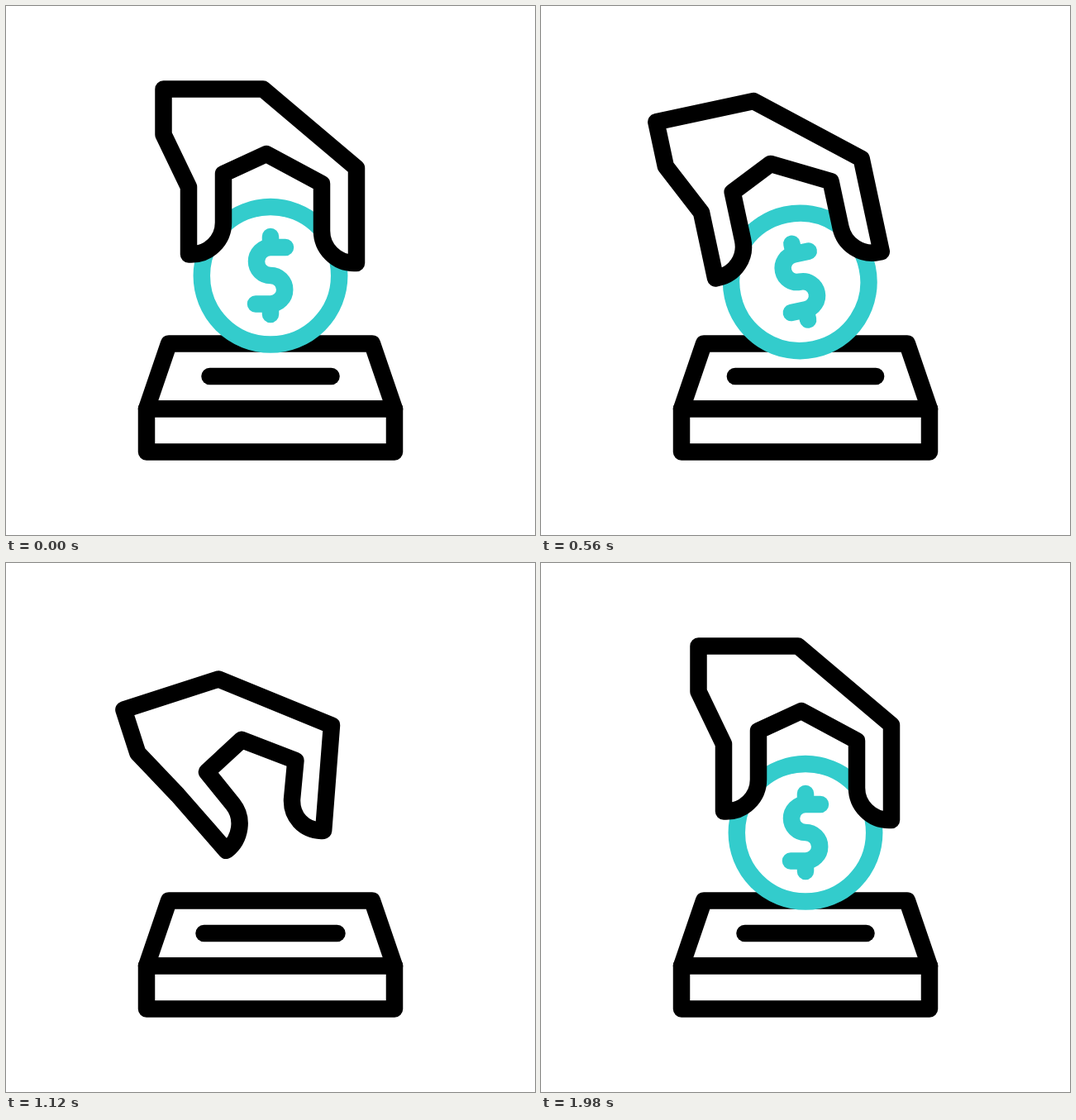
Animation of 640 by 640 pixels, one loop 2.4 s. Source, as an HTML page:

```html
<!DOCTYPE html>
<html lang="en">
<head>
<meta charset="utf-8">
<title>Coin donation</title>
<style>
  html, body { margin: 0; width: 100%; height: 100%; overflow: hidden; background: #fff; }
  svg { display: block; width: 100vw; height: 100vh; }
  .ink, .cash { fill: #fff; stroke: #000; stroke-width: 20.5; stroke-linecap: round; stroke-linejoin: round; }
  .cash { stroke: #3cc; }
</style>
</head>
<body>
<svg viewBox="0 0 640 640">
  <defs>
    <clipPath id="aboveSlot"><path d="M0 0H640V448H0Z"/></clipPath>
    <clipPath id="underPalm"><path d="M100 215L263 203L315 179L382 215H540V480H100Z"/></clipPath>
  </defs>
  <g class="ink">
    <path d="M197 408.5H443L470 487.5H170Z"/>
    <path d="M170 487.5H470V539.5H170Z"/>
  </g>
  <g clip-path="url(#aboveSlot)">
    <g id="grip">
      <g clip-path="url(#underPalm)">
        <g id="coin" class="cash">
          <circle cx="320" cy="326.3" r="83.2"/>
          <path fill="none" d="M338 292H320A17 17 0 0 0 320 326A17.2 17.2 0 0 1 320 360.4H302M320 279V292M320 360.4V373"/>
        </g>
      </g>
      <path id="hand" class="ink"/>
    </g>
  </g>
  <path id="slot" class="ink"/>
</svg>
<script>
  const LOOP = 2400, STEP = 20;
  const [grip, coin, hand, slot] =
    ['grip', 'coin', 'hand', 'slot'].map(id => document.getElementById(id));

  const smooth = p => p * p * (3 - 2 * p);
  const out = p => p * (2 - p);

  // Eased progress from 0 to 1 between two times.
  const ramp = (t, from, to, ease = smooth) =>
    ease(Math.min(1, Math.max(0, (t - from) / (to - from))));

  // Curve between a fingertip and its inner root, curling inwards with the pinch.
  function tipCurve(side, root, tip, pinch) {
    const s = 21.5 * Math.sin(0.36 * pinch), c = 21.5 * Math.cos(0.36 * pinch);
    return {
      nearRoot: [root[0] + side * s, root[1] + c],
      nearTip: [tip[0] + side * c, tip[1] - s]
    };
  }

  function handPath(k) {
    const fingerTip = [421 - 48 * k, 311 + 2.5 * k], fingerRoot = [382 - 31 * k, 272 - 6 * k];
    const thumbTip = [224 + 33 * k, 300.5], thumbRoot = [263 + 18 * k, 262 - 12 * k];
    const finger = tipCurve(-1, fingerRoot, fingerTip, k);
    const thumb = tipCurve(1, thumbRoot, thumbTip, k);
    return `M190.5 100.5H311L424 196L${424 - 48.5 * k} ${311 + 3 * k}L${fingerTip}` +
      `C${finger.nearTip} ${finger.nearRoot} ${fingerRoot}` +
      `L${382 - 12.5 * k} ${215 + 8 * k}L315 179L263 203L${thumbRoot}` +
      `C${thumb.nearRoot} ${thumb.nearTip} ${thumbTip}` +
      `L${221 + 35 * k} 300.5L221 219L190.5 155.5Z`;
  }

  function draw(t) {
    const lift = ramp(t, 0, 400);
    const dip = ramp(t, 400, 900);
    const rise = ramp(t, 900, 1475, out);
    const twist = ramp(t, 775, 1475);
    const rest = ramp(t, 1500, 1885);
    const pinch = ramp(t, 560, 920) - ramp(t, 1130, 1600);
    const widen = ramp(t, 200, 650) - ramp(t, 930, 1330);

    const x = 307 - 37.4 * lift + 23 * dip - 11.6 * rise + 26 * rest;
    const y = 205 - 51 * lift + 265 * dip - 287.5 * rise + 73.5 * rest;
    const turn = -12.1 * lift - 11.9 * twist + 24 * rest;
    grip.setAttribute('transform', `translate(${x} ${y}) rotate(${turn}) translate(-307 -205)`);
    hand.setAttribute('d', handPath(pinch));

    // Once dropped, the next coin waits inside the palm and slides out.
    const tuck = t < 900 ? 0 : 240 * (1 - ramp(t, 1500, 1900, out));
    coin.setAttribute('transform', `translate(0 ${-tuck})`);

    const half = 73.5 + 13 * widen;
    slot.setAttribute('d', `M${320 - half} 448H${320 + half}`);
  }

  const start = performance.now();
  function tick() {
    const t = (performance.now() - start) % LOOP;
    draw(Math.floor(t / STEP) * STEP);
    requestAnimationFrame(tick);
  }
  tick();
</script>
</body>
</html>
```
